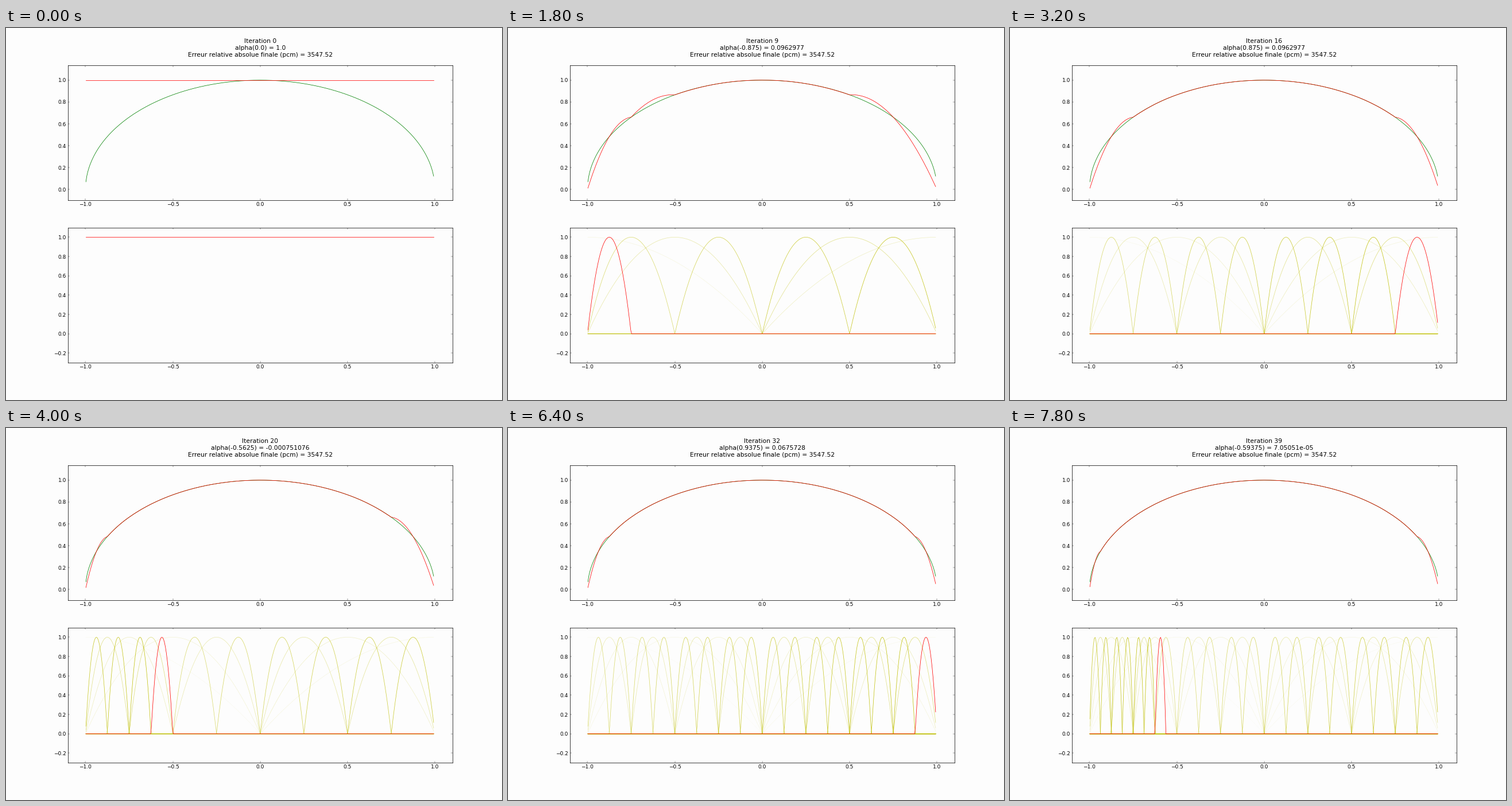
Write a matplotlib script that moves like this. It is 864 by 648 pixels and loops after 8 s.

```python
import numpy as np
import matplotlib.pyplot as plt
from matplotlib.animation import FuncAnimation

STEPS = 40
STEP_MS = 200
PAPER = "#fdfdfd"

plt.rcParams.update({
    "font.family": "DejaVu Sans",
    "font.size": 12,
    "axes.linewidth": 1.0,
    "axes.facecolor": PAPER,
    "lines.linewidth": 1.0,
    "xtick.direction": "in", "ytick.direction": "in",
    "xtick.top": True, "ytick.right": True,
    "xtick.major.size": 4, "ytick.major.size": 4,
    "xtick.major.width": 0.5, "ytick.major.width": 0.5,
    "xtick.major.pad": 4, "ytick.major.pad": 4,
})


def func(x):
    return np.sqrt(1 - x * x)


def nodes(count):
    """Centres and half-widths of the hierarchical basis, level by level."""
    found = [(0.0, None), (-1.0, 1.0), (1.0, 1.0)]
    half = 0.5
    while len(found) < count:
        found += [(c, half) for c in np.arange(-1 + half, 1, 2 * half)]
        half /= 2
    return [(float(c), h) for c, h in found[:count]]


def basis(x, center, half):
    if half is None:
        return np.ones_like(x)
    return np.maximum(0, 1 - ((x - center) / half) ** 2)


def decompose(grid):
    """Coefficients, basis curves and partial sums for every node."""
    coefs, shapes, sums = [], [], []
    total = np.zeros_like(grid)
    for i, (c, h) in enumerate(NODES):
        known = sum(a * basis(np.array(c), *n) for a, n in zip(coefs, NODES[:i]))
        coefs.append(float(func(c) - known))
        shapes.append(basis(grid, c, h))
        total = total + coefs[-1] * shapes[-1]
        sums.append(total)
    return coefs, shapes, sums


NODES = nodes(STEPS)
x = -0.9975 + 0.005 * np.arange(399)
coefs, shapes, sums = decompose(x)

fig, (top, bottom) = plt.subplots(2, 1, figsize=(16, 12), dpi=54, facecolor=PAPER)
fig.subplots_adjust(left=0.125, right=0.9, bottom=0.1, top=0.9, hspace=0.2)
for ax in (top, bottom):
    ax.set_xlim(-1.1, 1.1)
    ax.set_xticks(np.arange(-2, 3) / 2)
top.set_ylim(-0.1, 1.1368)
top.set_yticks(np.arange(0, 6) / 5)
bottom.set_ylim(-0.3, 1.1)
bottom.set_yticks(np.arange(-1, 6) / 5)

top.plot(x, func(x), color="#008000")
approx, = top.plot(x, sums[0], color="#ff0000")
trail = [bottom.plot(x, s, color="#bfbf00", visible=False)[0] for s in shapes]
active, = bottom.plot(x, shapes[0], color="#ff0000")


def heading(baseline, text=""):
    return fig.text(0.5125, 1 - baseline / 648, text, size=14.4,
                    ha="center", va="baseline")


count_label = heading(26)
coef_label = heading(38)
heading(50, "Erreur relative absolue finale (pcm) = 3547.52")


def update(i):
    approx.set_ydata(sums[i])
    active.set_ydata(shapes[i])
    for k, line in enumerate(trail):
        line.set_visible(0 < k < i)
        line.set_alpha(k / i if k < i else 0)
    value = float(f"{coefs[i]:.6g}")
    count_label.set_text(f"Iteration {i}")
    coef_label.set_text(f"alpha({NODES[i][0]}) = {value}")
    return [approx, active, count_label, coef_label, *trail]


anim = FuncAnimation(fig, update, frames=STEPS, interval=STEP_MS,
                     init_func=lambda: update(0), repeat=True, repeat_delay=0)
plt.show()
```
